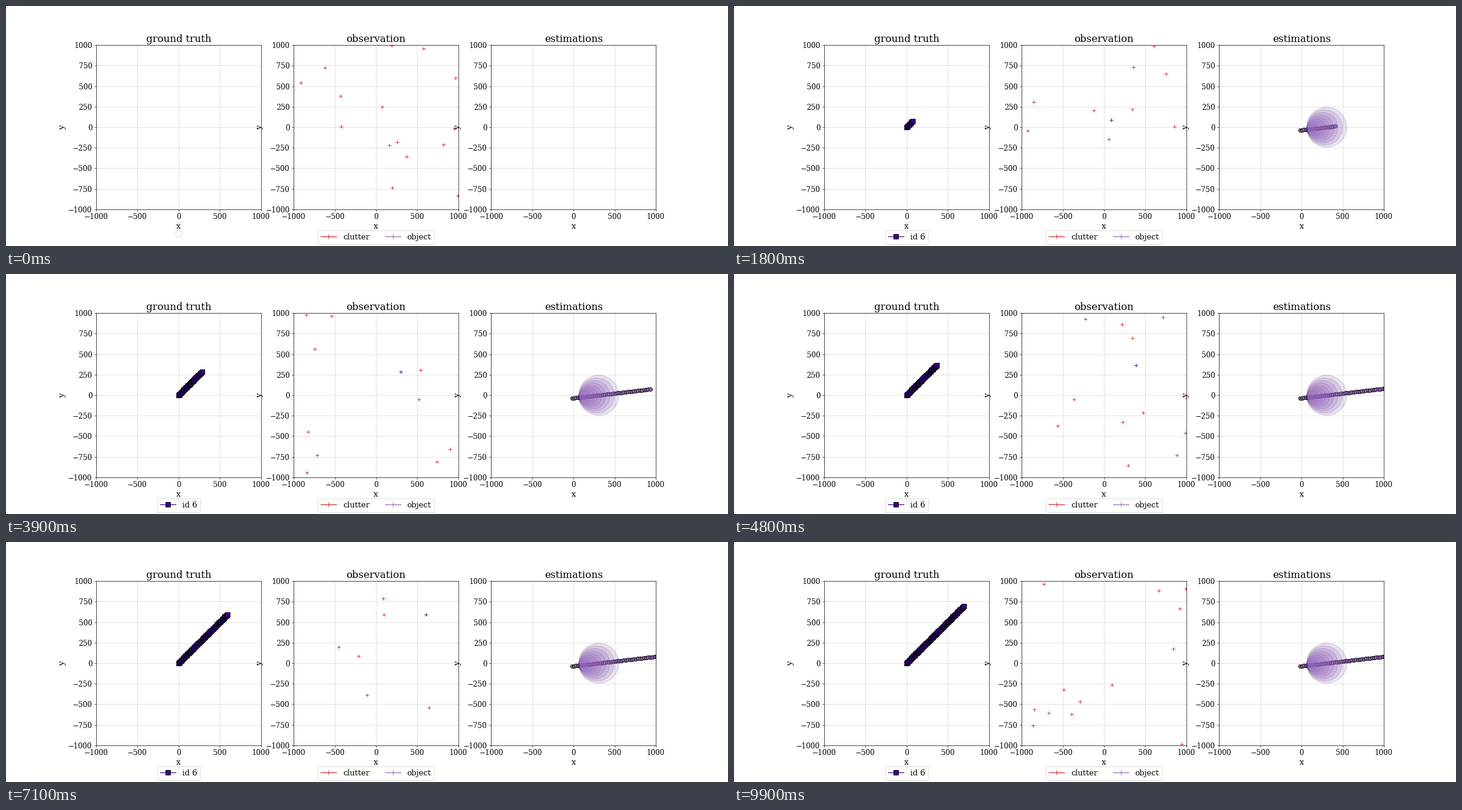
These frames come from a looping animation (1200 by 400 pixels, 10000 ms). A matplotlib script:

```python
import numpy as np
import matplotlib.pyplot as plt
from matplotlib.animation import FuncAnimation
from matplotlib.lines import Line2D
from matplotlib.patches import Circle

PX = 0.72           # points per pixel at 100 dpi
FRAMES = 100
BIRTH, DEATH = 11, 80
FIRST_DISC, LAST_DISC = 5, 14
INDIGO, RED, PURPLE = "#380282", "tab:red", "tab:purple"

plt.rcParams.update({
    "font.family": "DejaVu Serif",
    "axes.titlesize": 16.6 * PX,
    "axes.labelsize": 13 * PX,
    "axes.titlepad": 5 * PX,
    "axes.labelpad": 3 * PX,
    "axes.linewidth": 0.7 * PX,
    "legend.fontsize": 13 * PX,
    "patch.linewidth": 0.8 * PX,
    "grid.linewidth": 0.7 * PX,
    "grid.alpha": 0.5,
})
for side in ("xtick", "ytick"):
    plt.rcParams.update({
        f"{side}.labelsize": 12 * PX,
        f"{side}.major.size": 3 * PX,
        f"{side}.major.pad": 3.7 * PX,
        f"{side}.major.width": 0.7 * PX,
    })


def clutter(k):
    """False detections, spread evenly over the field."""
    rng = np.random.default_rng(100 + k)
    return rng.uniform(-1000, 1000, (2, max(6, rng.poisson(11))))


def truth(k):
    """Diagonal path, ten units per step with a slowly varying pace."""
    s = 10.0 * (np.asarray(k) - BIRTH)
    s = np.maximum(0, s + 5 * np.sin(2 * np.pi * (s - 250) / 205))
    return s, s


def detection(k):
    x, y = truth(k)
    rng = np.random.default_rng(500 + k)
    return x + rng.normal(18, 3), y + rng.normal(7, 6)


def estimate(k):
    """Nearly straight drift to the right with a small early bump."""
    x = -20 + 25.07 * (np.asarray(k) - 1)
    bump = 4 * np.exp(-((x - 25) / 30) ** 2)
    return x, 0.1177 * x - 36.5 + bump


def spread(k):
    """Radius of the uncertainty disc."""
    d = LAST_DISC - k
    return 243.5 - 30 * d + 0.73 * d * d


fig, axes = plt.subplots(1, 3, figsize=(12, 4), dpi=100)
for ax, name in zip(axes, ("ground truth", "observation", "estimations")):
    ax.set(title=name, xlabel="x", ylabel="y", aspect="equal",
           xlim=(-1000, 1000), ylim=(-1000, 1000),
           xticks=range(-1000, 1001, 500), yticks=range(-1000, 1001, 250))
    ax.grid(True)
left, mid, right = axes


def add_legend(ax, handles):
    ax.legend(handles, [h.get_label() for h in handles], loc="upper center",
              bbox_to_anchor=(0.5, -0.104), ncol=2)


def cross(color, size, **kw):
    return Line2D([], [], color=color, marker="+", markersize=size * PX,
                  markeredgewidth=0.9 * PX, **{"linewidth": 1.2 * PX, **kw})


def add_line(ax, line):
    ax.add_line(line)
    return line


track = add_line(left, Line2D(
    [], [], color=INDIGO, marker="s", markersize=7.2 * PX,
    markeredgecolor="black", markeredgewidth=0.8 * PX,
    linewidth=1.2 * PX, label="id 6"))
noise = add_line(mid, cross(RED, 6, linestyle="none"))
hit = add_line(mid, cross(INDIGO, 6, linestyle="none"))
dots = add_line(right, Line2D(
    [], [], linestyle="none", marker="o", markersize=6 * PX,
    markerfacecolor=PURPLE, markeredgecolor="black",
    markeredgewidth=0.9 * PX))
add_legend(mid, [cross(RED, 8, label="clutter"),
                 cross(PURPLE, 8, label="object")])

discs = {}
for n in range(FIRST_DISC, LAST_DISC + 1):
    discs[n] = right.add_patch(Circle(
        estimate(n), spread(n), facecolor=PURPLE, edgecolor="black",
        alpha=0.2, linewidth=0.9 * PX, zorder=3))


def draw(k):
    alive = BIRTH <= k <= DEATH
    track.set_data(*truth(np.arange(BIRTH, min(k, DEATH) + 1)))
    add_legend(left, [track] if k >= BIRTH else [])

    noise.set_data(*clutter(k))
    x, y = detection(k)
    hit.set_data([x] if alive else [], [y] if alive else [])

    dots.set_data(*estimate(np.arange(1, k + 1)))
    for n, disc in discs.items():
        disc.set_visible(n <= k)
    return track, noise, hit, dots


anim = FuncAnimation(fig, draw, frames=FRAMES, interval=100, repeat=True,
                     repeat_delay=0)
plt.show()
```
